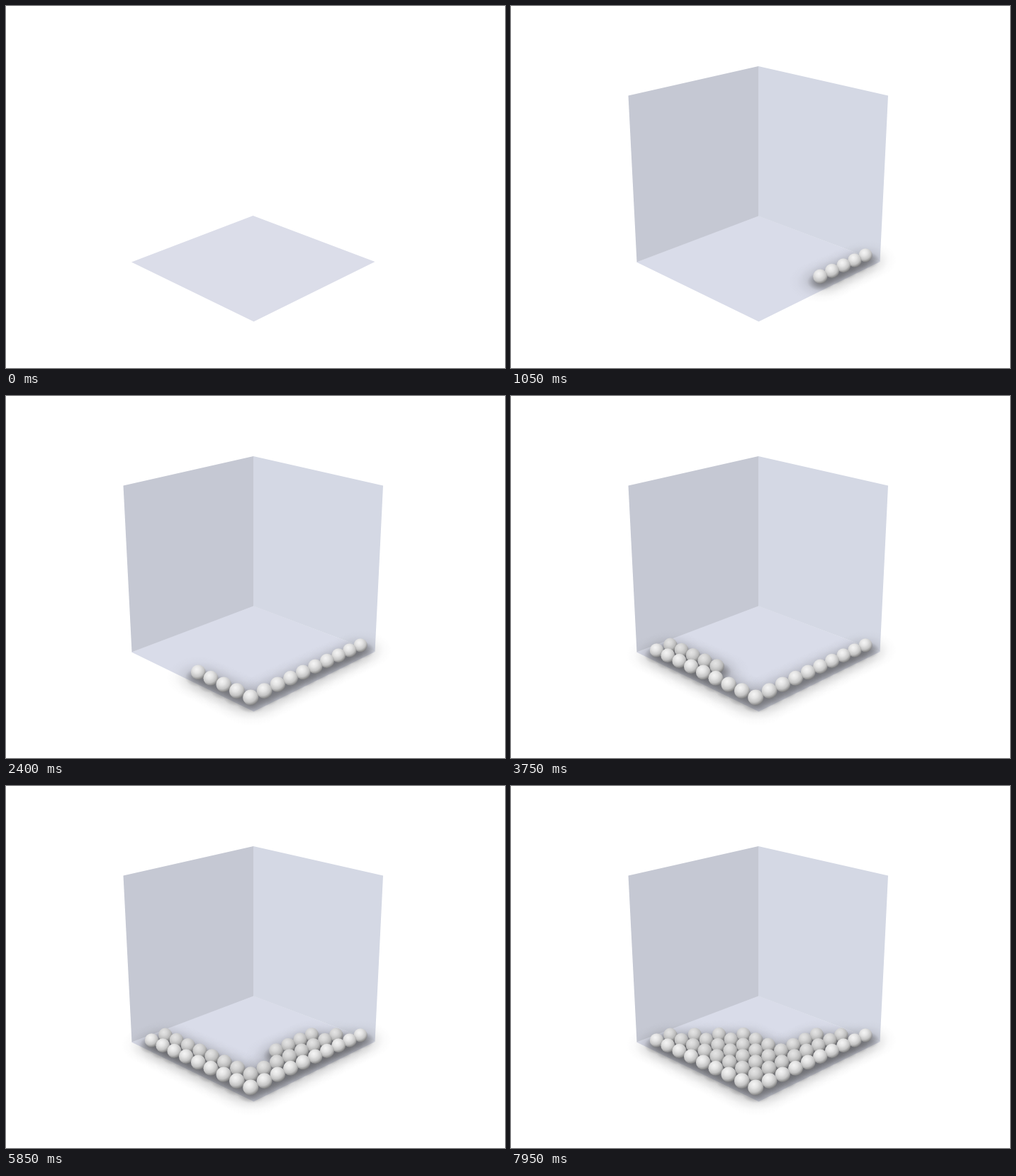
Write an HTML page with a canvas that moves like this. It is 704 px wide and 511 px high and loops after 8 s.

```html
<!DOCTYPE html>
<html lang="en">
<head>
<meta charset="utf-8">
<title>Balls filling a box</title>
<style>
html, body { margin: 0; width: 100%; height: 100%; overflow: hidden; background: #fff; }
canvas { display: block; }
</style>
</head>
<body>
<canvas id="stage" width="704" height="511"></canvas>
<script>
const ctx = document.getElementById('stage').getContext('2d');
const LOOP = 8000, STEP = 150;

const FLOOR = [[348.5, 296], [520.5, 361], [349.5, 445.5], [177, 361.5]];
const LEFT = [[165.5, 126.5], [349, 85], [349, 296.5], [177.5, 361.5]];
const RIGHT = [[349, 85], [532, 126.5], [520.5, 361], [349, 296.5]];

// Filling order: L-shaped rows that turn back at each end, then straight columns.
function fillOrder() {
  const path = [];
  for (let n = 0; n < 3; n++) {
    const row = [];
    for (let i = 9 - n; i >= n; i--) row.push([i, n]);
    for (let j = n + 1; j <= (n ? 9 - n : 8); j++) row.push([n, j]);
    if (n % 2) row.reverse();
    path.push(...row);
  }
  for (let j = 6; j >= 3; j--) path.push([3, j]);
  for (let j = 3; j <= 5; j++) path.push([4, j]);
  return path;
}

// Perspective place of a grid cell on the stage.
function place([i, j]) {
  const s = i + j, d = i - j, w = 1 + 0.0157 * s;
  return {
    x: 345.2 + 19.65 * d / w,
    y: 425.5 - 9.53 * s / w + 0.018 * d * d,
    r: 11 / w,
    depth: s,
    inner: Math.min(i, j) > 0
  };
}

const balls = fillOrder().map(place);

function poly(points, color) {
  ctx.beginPath();
  points.forEach(([x, y]) => ctx.lineTo(x, y));
  ctx.closePath();
  ctx.fillStyle = color;
  ctx.fill();
}

function disc(x, y, r, fill) {
  ctx.beginPath();
  ctx.arc(x, y, r, 0, Math.PI * 2);
  ctx.fillStyle = fill;
  ctx.fill();
}

function softSpot(x, y, rx, ry, alphas) {
  const g = ctx.createRadialGradient(0, 0, 0, 0, 0, rx);
  alphas.forEach((a, n) => g.addColorStop(n / (alphas.length - 1), `rgba(76,76,78,${a})`));
  ctx.save();
  ctx.translate(x, y);
  ctx.scale(1, ry / rx);
  disc(0, 0, rx, g);
  ctx.restore();
}

function shadow({ x, y, r }) {
  const k = r / 11;
  softSpot(x + 1, y + 8 * k, 49 * k, 32 * k, [0.3, 0.21, 0.09, 0.025, 0]);
  softSpot(x + 1, y + 8 * k, 21 * k, 14 * k, [0.55, 0.3, 0]);
}

function ball({ x, y, r, inner }) {
  const g = ctx.createRadialGradient(x - 0.22 * r, y - 0.4 * r, 0, x - 0.22 * r, y - 0.4 * r, 1.45 * r);
  g.addColorStop(0, '#f5f5f5');
  g.addColorStop(0.35, '#e4e4e4');
  g.addColorStop(0.7, '#c4c4c4');
  g.addColorStop(1, '#7c7c7c');
  disc(x, y, r, g);
  if (inner) disc(x, y, r, 'rgba(90,90,90,0.1)');
}

function draw(time) {
  const step = Math.floor((time % LOOP) / STEP);
  const shown = balls.slice(0, Math.max(0, step - 2));
  ctx.fillStyle = '#fff';
  ctx.fillRect(0, 0, 704, 511);
  poly(FLOOR, step ? '#d9dce9' : '#dbdde9');
  if (step > 0) poly(LEFT, '#c5c8d3');
  if (step > 1) poly(RIGHT, '#d4d8e4');
  shown.forEach(shadow);
  shown.sort((a, b) => b.depth - a.depth).forEach(ball);
}

const start = performance.now();
function tick() {
  draw(performance.now() - start);
  requestAnimationFrame(tick);
}
tick();
</script>
</body>
</html>
```
